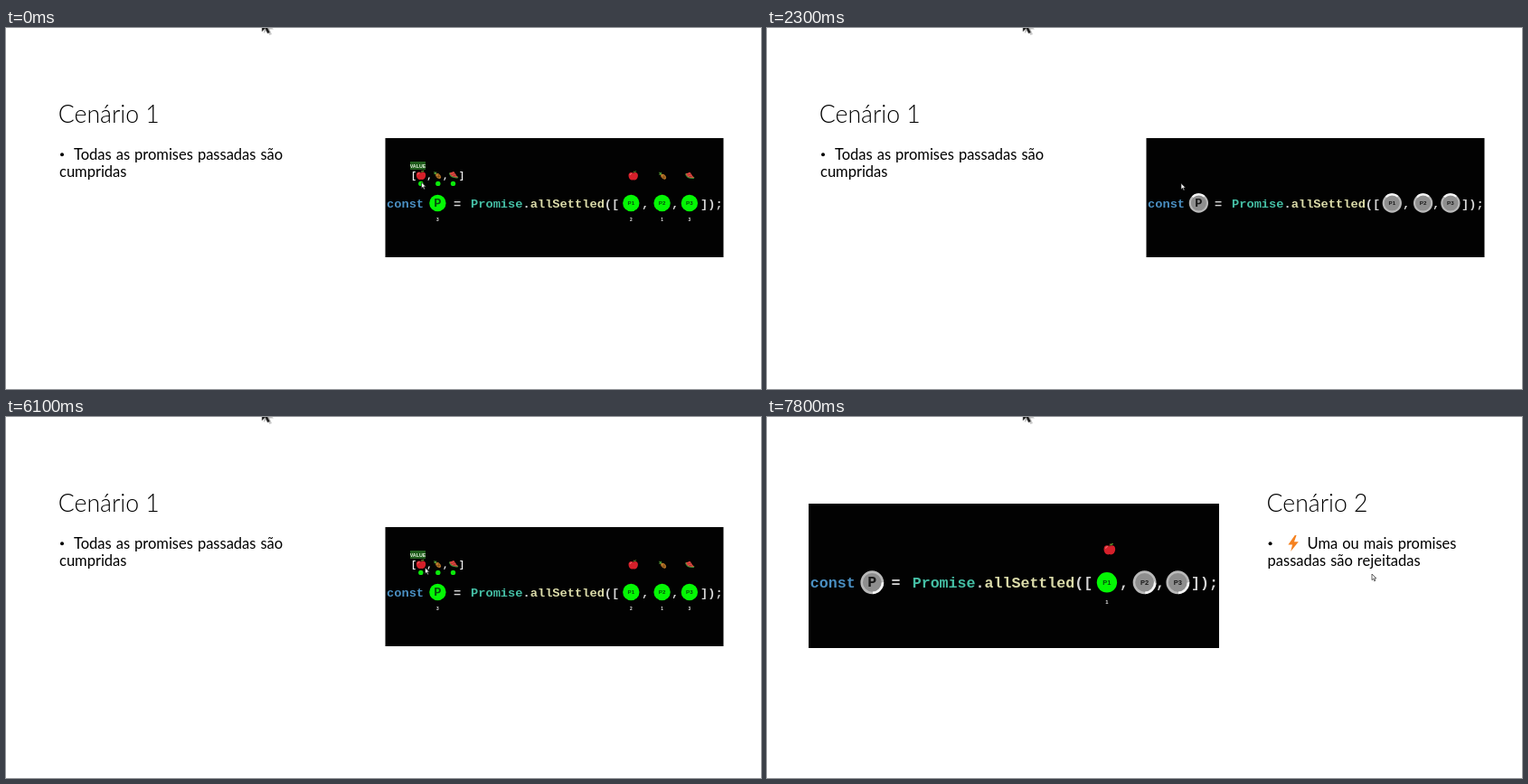
Animation, 835 px wide and 400 px high, one loop 8 s. Source, as an HTML page:

```html
<!DOCTYPE html>
<html lang="pt">
<head>
<meta charset="utf-8">
<title>Promise.allSettled</title>
<style>
  html, body { margin: 0; width: 100%; height: 100%; overflow: hidden; background: #fff; }
  svg { display: block; width: 835px; height: 400px; }
  text { white-space: pre; }
  .title { font: 300 26.6px Lato, sans-serif; }
  .body { font: 400 16.5px Lato, sans-serif; word-spacing: .8px; }
  .code { font: 700 13.7px "Liberation Mono", monospace; fill: #d4d4d4; }
  .list { font: 700 10px "Liberation Mono", monospace; fill: #f4f4f4; }
  .name { font: 700 6.2px "Liberation Sans", sans-serif; }
  .count { font: 700 4.8px "Liberation Sans", sans-serif; fill: #eee; }
  .tag { font: 700 5.3px "Liberation Sans", sans-serif; fill: #e6f4e0; }
  .mid { text-anchor: middle; }
  .off { display: none; }
</style>
</head>
<body>
<svg viewBox="0 0 835 400">
  <defs>
    <g id="apple">
      <path d="M0-2.6C2-4.4 5.4-3.6 5.2.2C5 3.6 2.6 5.6 0 4.7C-2.6 5.6-5 3.6-5.2.2C-5.4-3.6-2-4.4 0-2.6Z" fill="#d5202a"/>
      <path d="M-3.6-.6Q-3.2-2.4-1.6-2.4" stroke="#f2777a" stroke-width=".9" fill="none"/>
      <path d="M0-2.6L.6-5" stroke="#7a4322" stroke-width=".9"/>
      <path d="M.5-3.6Q1.4-5.8 3.6-5Q2.6-3.2.5-3.6Z" fill="#5d9c2c"/>
    </g>
    <g id="pineapple" transform="rotate(-45)">
      <path d="M-.4-1.4L-2.3-3.8L-.9-3.5L0-5.8L.9-3.5L2.3-3.8L.4-1.4Z" fill="#4f9432"/>
      <ellipse cy="1.6" rx="2.3" ry="3.4" fill="#b9772a"/>
      <path d="M-1.9.4L1.5 3.8M1.9.4L-1.5 3.8" stroke="#70420f" stroke-width=".6"/>
    </g>
    <g id="melon" transform="rotate(12)">
      <path d="M-5.4-.6Q-2.4 4.6 5.2 2.4L5.6.8L-4.6-2Z" fill="#3f8a35"/>
      <path d="M-4.7-1.2Q-2 3.2 5 1.4L-.6-3.9Z" fill="#e2463f"/>
      <path d="M-2-.8v.9M0-1.8v.9M.6.4v.9M2.2-.2v.8" stroke="#41161a" stroke-width=".7"/>
    </g>
  </defs>

  <rect width="835" height="400" fill="#fff"/>

  <g id="slide1">
    <text class="title" x="57.8" y="105">Cenário 1</text>
    <circle cx="62" cy="140.3" r="2"/>
    <text class="body" x="75" y="146">Todas as promises passadas são</text>
    <text class="body" x="59" y="165">cumpridas</text>
  </g>
  <g id="slide2">
    <text class="title" x="552.6" y="105">Cenário 2</text>
    <circle cx="556.6" cy="140.3" r="2"/>
    <path d="M583.8 131L576.4 141.4H581L579.2 149L587.8 138.2H583L585.6 131Z" fill="#f58220"/>
    <text class="body" x="597.5" y="146">Uma ou mais promises</text>
    <text class="body" x="553.6" y="165">passadas são rejeitadas</text>
  </g>

  <g id="panel">
    <rect x="419.5" y="122" width="374" height="132" fill="#020202"/>
    <g class="code">
      <text x="421" y="198.5" fill="#4a8fc2">const</text>
      <text class="mid" x="499" y="198.5">=</text>
      <text x="514" y="198.5"><tspan fill="#45bfa5">Promise</tspan>.<tspan fill="#dcdcaa">allSettled</tspan>([</text>
      <text class="mid" x="707" y="198.5">,</text>
      <text class="mid" x="740" y="198.5">,</text>
      <text x="768" y="198.5">]);</text>
    </g>
    <g id="nodes"></g>
    <g id="result">
      <g class="list mid">
        <text x="451" y="166.5">[</text>
        <text x="468.3" y="166.5">,</text>
        <text x="486" y="166.5">,</text>
        <text x="504" y="166.5">]</text>
      </g>
      <use href="#apple" x="459" y="163"/>
      <use href="#pineapple" transform="translate(477 163)"/>
      <use href="#melon" transform="translate(495 163)"/>
      <g fill="#0be80b">
        <circle cx="458.8" cy="172.4" r="2.7"/>
        <circle cx="477.8" cy="172.4" r="2.7"/>
        <circle cx="494.5" cy="172.4" r="2.7"/>
      </g>
      <rect x="447" y="148" width="17" height="9" fill="#1f5c1c"/>
      <text class="tag mid" x="455.5" y="154.5">VALUE</text>
    </g>
  </g>

  <path id="pointer" d="M0 0V6.6L1.6 5.2L2.7 7.8L3.8 7.3L2.7 4.8H4.8Z" fill="#fff" stroke="#222" stroke-width=".7"/>
  <g transform="translate(283 -13)">
    <path d="M2 2V19L5.6 15.5L8.4 21L11 20L8.6 14.6H13Z" fill="#bbb" opacity=".8"/>
    <path d="M0 0V17L3.6 13.5L6.2 19L8.8 17.9L6.4 12.8H10.6Z" fill="#1a1a1a" stroke="#888" stroke-width=".5"/>
  </g>
</svg>

<script>
const LOOP = 8000, SLIDE = 6400, RESET = 2000;
const $ = id => document.getElementById(id);

// The screen refreshes every 100 ms inside these spans and holds between them.
const spans = [[0, 900], [1000, 1400], [1600, 2300], [2800, 3200], [3400, 3800],
  [4000, 4100], [4300, 4600], [4800, 5100], [5400, 5500], [5700, 5800], [6000, 6100],
  [6400, 6400], [6600, 6700], [6900, 7000], [7200, 7300], [7500, 7500], [7700, 7800]];

const pointer = [[0, 459.5, 171], [900, 459.5, 171], [1400, 457.5, 173], [2200, 457.5, 173],
  [2800, 460.5, 168], [3400, 460.5, 168], [3800, 463.5, 167], [6400, 463.5, 167],
  [6700, 610, 169], [7000, 690, 172], [7300, 656, 174], [7500, 656, 174], [7800, 669, 174]];

// done: when it settles on slide 1; again: on slide 2
const nodes = [
  { name: 'P', x: 477.4, count: 3, done: 5700 },
  { name: 'P1', x: 691.3, count: 2, done: 4800, again: 7500, fruit: 'apple', fx: 693.7 },
  { name: 'P2', x: 725.6, count: 1, done: 2800, fruit: 'pineapple', fx: 726 },
  { name: 'P3', x: 755.9, count: 3, done: 5700, fruit: 'melon', fx: 756.2 }
];

$('nodes').innerHTML = nodes.map(({ name, x, fruit, fx }, i) => {
  const style = name === 'P' ? 'class="code mid" y="198.2"' : 'class="name mid" y="196.3"';
  const label = color => `<text ${style} x="${x}" style="fill:${color}">${name}</text>`;
  return `<g id="wait${i}">
    <circle cx="${x}" cy="194" r="9.6" fill="#8e8e8e" stroke="#b9b9b9" stroke-width="2.1"/>
    <circle id="arc${i}" cx="${x}" cy="194" r="9.6" fill="none" stroke="#f4f4f4"
      stroke-width="2.1" pathLength="100" stroke-dasharray="24 76"/>${label('#181818')}</g>
  <g id="done${i}"><circle cx="${x}" cy="194" r="9.2" fill="#04f704"/>${label('#064d0c')}
    <text id="count${i}" class="count mid" x="${x}" y="213.8"></text>
    ${fruit ? `<use href="#${fruit}" transform="translate(${fx} 163.6)"/>` : ''}</g>`;
}).join('');

const show = (id, on) => $(id).classList.toggle('off', !on);

function hold(t) {
  const [from, to] = spans.filter(s => s[0] <= t).pop();
  return Math.max(from, Math.min(to, Math.floor(t / 100) * 100));
}

function pointerAt(t) {
  const i = pointer.findIndex(p => p[0] > t);
  if (i < 0) return pointer[pointer.length - 1].slice(1);
  const [a, b] = [pointer[i - 1], pointer[i]];
  const k = (t - a[0]) / (b[0] - a[0]);
  return [a[1] + (b[1] - a[1]) * k, a[2] + (b[2] - a[2]) * k];
}

function draw(now) {
  const t = hold(now % LOOP);
  const second = t >= SLIDE;
  show('slide1', !second);
  show('slide2', second);
  $('panel').setAttribute('transform',
    second ? 'translate(46 96) scale(1.2139 1.2121) translate(-419.5 -122)' : '');

  const turn = second ? 10 + (t - SLIDE) * .25 : 90 + (t - 3200) * .25;
  nodes.forEach((n, i) => {
    const done = second ? t >= n.again : t < RESET || t >= n.done;
    show('wait' + i, !done);
    show('done' + i, done);
    $('count' + i).textContent = second ? 1 : n.count;
    $('arc' + i).setAttribute('transform', `rotate(${turn} ${n.x} 194)`);
  });
  show('result', !second && (t < RESET || t >= nodes[0].done));
  $('pointer').setAttribute('transform', `translate(${pointerAt(t)})`);
}

const start = performance.now();
function tick() {
  draw(performance.now() - start);
  requestAnimationFrame(tick);
}
tick();
</script>
</body>
</html>
```
